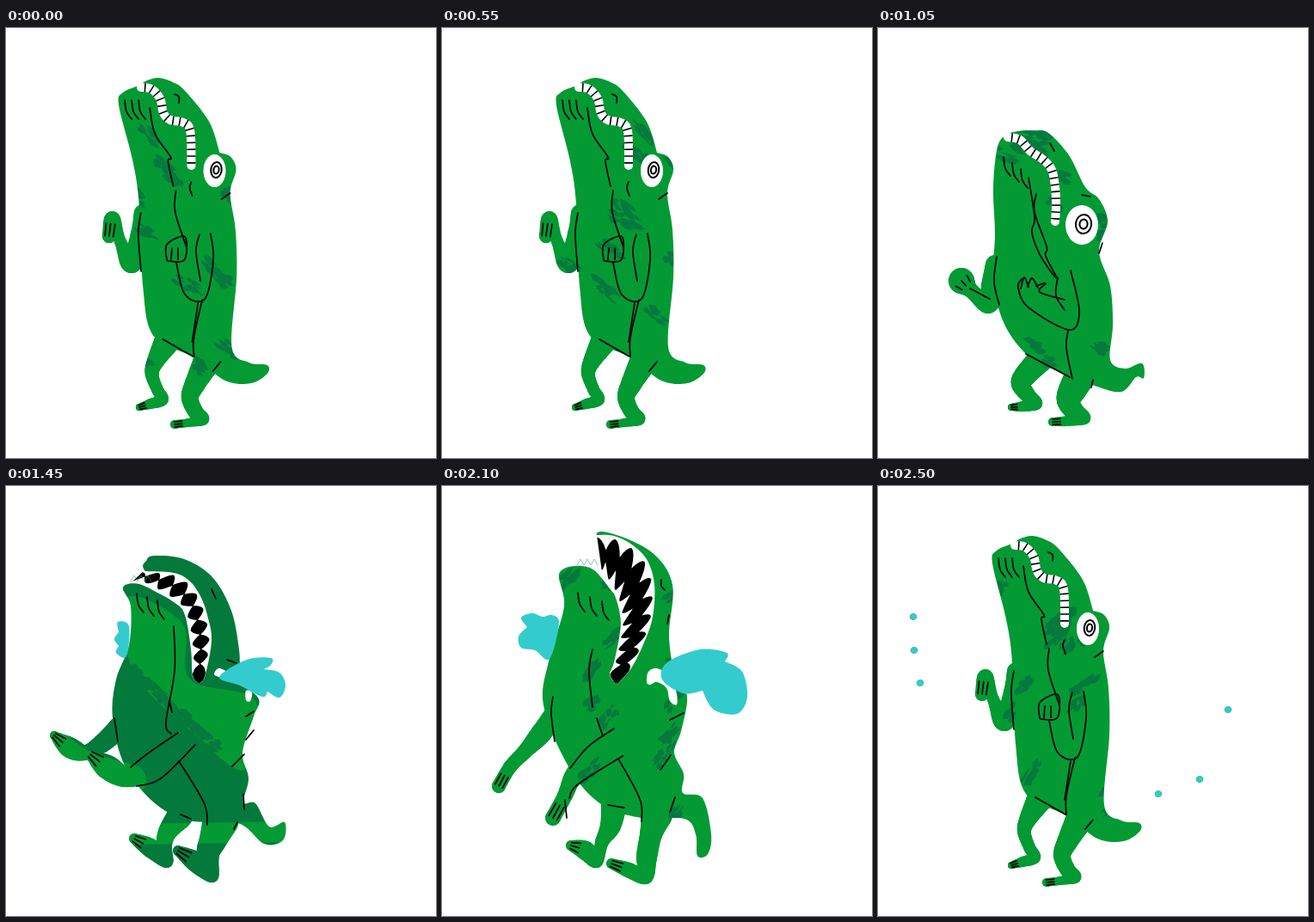
Recreate the animation shown at these times as an HTML page with a canvas. Size 500 by 500 pixels, loop 2550 ms.

```html
<!DOCTYPE html>
<html lang="en">
<head>
<meta charset="utf-8">
<title>Crying crocodile</title>
<style>
html, body { margin: 0; width: 100%; height: 100%; overflow: hidden; background: #fff; }
canvas { display: block; width: 500px; height: 500px; }
</style>
</head>
<body>
<canvas id="stage" width="500" height="500"></canvas>
<script>
const ctx = document.getElementById('stage').getContext('2d');
const GREEN = '#039a34', DARK = '#04793c', CYAN = '#34cbce', WHITE = '#fff', BLACK = '#000';
const STEP = 50, LOOP = 2550, BURST = 300, FIRST_BURST = 1500;

// Key points of smooth curves; a doubled point is a corner.
// Limbs run from the root to the tip as x,y,radius.
const poses = {
  stand: {
    body: '156,67 166,61 180,58 196,63 210,73 238,109 250,145 250,145 263,150 269,165 262,192 268,235 269,290 263,371 283,389 304,392 304,402 285,413 255,410 219,383 172,358 160,300 156,205 149,155 133,90 138,75',
    limbs: [
      '160,215,10 157,240,11 147,273,12 134,248,7 125,222,9 121,242,8',
      '234,388,16 220,414,12 214,430,10 221,447,9 229,455,7 212,459,5 196,461,5',
      '188,364,15 174,388,10 170,402,8 176,420,7 182,432,7 168,437,6 155,441,4'
    ],
    lines: [
      '158,215 155,240 158,283', '169,93 175,123 193,150 190,155 196,184', '199,189 198,214 211,255',
      '217,179 215,186 218,195', '198,77 203,80 203,87',
      '188,270 188,252 206,242 211,249 208,270 189,271', '194,256 193,269', '201,256 201,269',
      '199,273 209,310 232,315 242,270 239,239', '226,240 222,260 227,294',
      '229,316 219,360 219,382', '224,320 217,365', '183,362 218,382', '252,199 262,192', '241,399 250,388'
    ],
    folds: [140, 84, 8, 0],
    band: '159,69 171,71 181,82 185,99 193,107 208,110 216,120 217,160',
    eye: [244, 166, 13, 19]
  },
  crouch: {
    body: '150,124 163,120 180,119 198,122 222,148 241,185 257,199 267,225 257,260 270,300 273,345 270,386 287,396 307,390 309,407 300,406 283,423 252,416 204,397 171,378 145,340 134,290 136,240 134,185 139,138',
    limbs: [
      '136,275,11 133,300,13 128,321,11 108,305,9 97,294,15',
      '236,403,18 226,421,16 221,433,13 228,445,11 240,454,7 220,457,6 203,458,5',
      '190,384,15 172,403,13 166,414,11 175,428,9 184,437,7 168,440,6 155,441,4'
    ],
    lines: [
      '200,134 205,143', '175,174 182,220 179,238 189,265 206,290', '184,193 182,214 196,254 195,265 209,292',
      '237,194 247,196', '261,250 257,262', '224,282 234,330 222,351 175,325 163,302 167,292',
      '166,303 170,290 175,301', '174,301 179,291 186,302', '184,300 195,297 188,307 217,316', '209,290 207,311 217,328',
      '221,352 219,372 226,408', '172,379 223,406', '250,409 248,418', '138,266 135,295 141,322', '107,303 130,315'
    ],
    folds: [146, 150, 10, 7],
    band: '151,127 165,130 177,143 192,153 202,165 206,185 207,205 206,225',
    eye: [237, 229, 19, 23]
  },
  sob: {
    body: '161,98 163,87 172,81 207,85 240,106 262,145 271,190 274,226 294,248 288,268 275,310 282,340 276,368 290,369 306,396 324,391 322,412 300,416 270,392 213,389 172,368 138,325 124,270 128,225 143,185 145,140 136,118 155,114 190,130',
    limbs: [
      '132,281,13 112,299,11 92,310,9 74,304,12 56,290,5',
      '218,293,8 185,314,17 160,332,14 138,338,12 118,327,14 98,312,6',
      '250,388,21 241,411,16 235,428,13 240,454,7 222,438,12 200,424,6',
      '202,384,15 188,402,11 184,418,9 187,437,7 168,421,11 149,410,6'
    ],
    lines: [
      '239,120 244,131', '257,202 268,206', '195,163 196,215 186,275 192,288', '190,250 193,263', '126,270 130,297',
      '145,327 165,311 200,287', '152,349 180,340 220,301', '201,320 230,368 234,394', '203,382 215,387',
      '288,262 279,268', '288,284 279,295', '277,312 263,326', '276,358 277,376', '269,391 265,399'
    ],
    folds: [152, 125, 12, 4],
    upper: '160,99 195,101 213,110 226,128 234,150 239,180 231,222 224,229',
    lower: '146,112 158,113 195,135 208,150 215,190 217,221 224,229',
    gum: .1, tip: .48, snout: [145, 111],
    wings: [
      '248,222 280,202 308,200 308,208 300,213 300,213 318,217 325,232 318,246 304,239 304,239 298,245 272,232',
      '143,163 130,158 131,170 131,170 126,178 131,186 131,186 128,194 140,198'
    ],
    whites: ['242,219 247,212 256,216 250,222', '279,238 286,240 284,250 279,249']
  },
  wail: {
    body: '180,58 200,56 245,78 268,115 264,175 272,225 285,245 278,285 270,310 281,335 280,357 303,363 313,405 309,428 297,430 295,405 282,387 232,386 185,370 148,328 118,255 125,200 142,140 137,100 172,95 200,125 215,135 215,100',
    limbs: [
      '132,264,12 115,288,12 97,308,9 79,327,8 66,349,8',
      '205,298,16 176,316,17 153,338,11 143,360,9 129,386,9',
      '250,382,18 243,405,13 238,432,12 237,455,8 218,447,9 197,439,6',
      '200,370,15 196,395,12 186,414,8 180,437,7 167,424,11 150,418,6'
    ],
    lines: [
      '255,109 255,116 259,121', '175,190 171,215 175,257', '180,270 187,291', '129,245 127,265 131,297',
      '149,328 170,303 200,282', '148,363 158,347 210,314', '205,317 230,364 232,390', '193,371 212,374',
      '281,264 265,272', '266,313 254,330', '265,379 271,362', '264,150 262,160', '143,365 145,386'
    ],
    folds: [158, 124, 14, 5],
    upper: '180,57 200,58 222,69 239,87 247,115 245,152 235,182 220,212 205,229',
    lower: '186,100 200,125 207,150 207,170 200,205 195,219 201,229',
    gum: .06, tip: .36, snout: [157, 92],
    wings: [
      '256,225 262,205 300,190 331,194 329,204 329,204 349,216 355,245 345,264 325,264 312,256 303,238 303,238 280,241',
      '136,160 128,150 117,152 105,148 92,153 99,164 99,164 89,175 92,188 108,191 125,201'
    ],
    whites: ['238,228 240,216 250,212 262,220 272,238 273,254 265,250 261,235 250,228 242,231']
  }
};

// One letter per 100 ms: pose, height factor, lean
const order = 'ABABABABbcCCsdDEFDEFDEFDsB';
const beats = {
  A: ['stand', 1, .005], B: ['stand', 1], b: ['stand', .9], c: ['crouch', .97], C: ['crouch', 1],
  s: ['crouch', 1.1], d: ['sob', .98], D: ['sob', 1], E: ['wail', 1], F: ['wail', .97]
};

const mix = (a, b, k) => a.map((v, i) => v + (b[i] - v) * k);

// Samples a Catmull-Rom spline through points of any dimension
function spline(s, closed = false) {
  const p = s.split(' ').map(q => q.split(',').map(Number)), n = p.length, out = [];
  const at = i => closed ? p[(i + n) % n] : p[Math.max(0, Math.min(n - 1, i))];
  for (let i = 0; i < (closed ? n : n - 1); i++) {
    const [a, b, c, d] = [at(i - 1), at(i), at(i + 1), at(i + 2)];
    for (let t = 0; t < 1; t += .1) {
      out.push(b.map((v, j) => v + t / 2 * (c[j] - a[j] + t * (2 * a[j] - 5 * v + 4 * c[j] - d[j]
        + t * (3 * (v - c[j]) + d[j] - a[j])))));
    }
  }
  if (!closed) out.push(p[n - 1]);
  return out;
}

// Point at share u of a polyline's length, with its direction
function along(p, u) {
  const len = p.slice(1).map((q, i) => Math.hypot(q[0] - p[i][0], q[1] - p[i][1]));
  let d = u * len.reduce((a, b) => a + b), i = 0;
  while (i < len.length - 1 && d > len[i]) d -= len[i++];
  const [a, b] = [p[i], p[i + 1]];
  return [...mix(a, b, len[i] ? d / len[i] : 0), Math.atan2(b[1] - a[1], b[0] - a[0])];
}

function random(seed) {
  let s = seed * 7919 + 17;
  return () => {
    s = s + 0x6D2B79F5 | 0;
    let t = Math.imul(s ^ s >>> 15, 1 | s);
    t = t + Math.imul(t ^ t >>> 7, 61 | t) ^ t;
    return ((t ^ t >>> 14) >>> 0) / 4294967296;
  };
}

function trace(p) {
  ctx.beginPath();
  p.forEach(([x, y]) => ctx.lineTo(x, y));
}

function fill(p, color) {
  trace(p);
  ctx.fillStyle = color;
  ctx.fill();
}

function stroke(p, width = 1.7, color = BLACK) {
  trace(p);
  ctx.lineWidth = width;
  ctx.strokeStyle = color;
  ctx.stroke();
}

function oval(x, y, rx, ry, tilt = 0) {
  ctx.beginPath();
  ctx.ellipse(x, y, rx, ry, tilt, 0, 7);
}

function limb(s) {
  ctx.fillStyle = GREEN;
  for (const [x, y, r] of spline(s)) {
    oval(x, y, r, r);
    ctx.fill();
  }
}

// Three creases fanning back from the tip of a limb
function claws(s) {
  const p = spline(s), end = p[p.length - 1], root = p[p.length - 8];
  const a = Math.atan2(end[1] - root[1], end[0] - root[0]);
  for (const side of [-.6, 0, .6]) {
    stroke([end, root].map(([x, y, r]) => [x - Math.sin(a) * r * side, y + Math.cos(a) * r * side]));
  }
}

function folds([x, y, dx, dy]) {
  for (let i = 0; i < 3; i++, x += dx, y += dy) {
    stroke(spline(`${x},${y} ${x + 2},${y + 13} ${x + 8},${y + 22}`));
  }
}

// A dry brush mark: ragged slivers lying along one direction
function brush(rnd, x, y, angle, length) {
  const c = Math.cos(angle), s = Math.sin(angle);
  for (let i = 0; i < 14; i++) {
    const u = (rnd() - .5) * length, v = (rnd() - .5) * 12;
    const l = 3 + rnd() * length * .22, h = 1 + rnd() * 3;
    const shape = [[-l, 0], [-l * .3, -h], [l, -h * .6], [l * .6, h * .5], [-l * .2, h]];
    fill(shape.map(([a, b]) => [x + (u + a) * c - (v + b) * s, y + (u + a) * s + (v + b) * c]), DARK);
  }
}

function texture(frame, soaked) {
  const rnd = random(frame + 1);
  ctx.globalCompositeOperation = 'source-atop';
  if (soaked) {
    ctx.fillStyle = DARK;
    ctx.fillRect(0, 0, 500, 500);
    fill(spline('140,130 205,160 214,225 290,250 278,330 215,285 148,215', true), GREEN);
    stroke(spline('50,296 90,325 145,342'), 36, GREEN);
    stroke(spline('145,405 330,402'), 24, GREEN);
    for (let i = 0; i < 8; i++) brush(rnd, 145 + i * 13, 212 + i * 12, .7, 32);
  } else {
    const lean = frame < 20 ? .7 : frame < 28 ? .35 : -.8;
    for (let i = 0; i < 13; i++) {
      brush(rnd, 140 + rnd() * 135, 100 + rnd() * 310, lean + (rnd() - .5) * .4, 14 + rnd() * 26);
    }
  }
  ctx.globalCompositeOperation = 'source-over';
}

function closedTeeth(s) {
  const p = spline(s), ticks = 16;
  stroke(p, 10, WHITE);
  for (let i = 0; i < ticks; i++) {
    const [x, y, a] = along(p, (i + .6) / ticks), dx = Math.sin(a) * 4.5, dy = Math.cos(a) * 4.5;
    stroke([[x - dx, y + dy], [x + dx, y - dy]], 1.6);
  }
}

// Pointed teeth: the dark gap narrows sharply once per tooth
function openMouth({ upper, lower, gum, tip, snout: [x, y] }) {
  const up = spline(upper), low = spline(lower), teeth = 10, n = teeth * 8;
  fill([...up, ...low.slice().reverse()], WHITE);
  const edge = (a, b) => Array.from({ length: n + 1 }, (_, i) => {
    const u = i / n, bite = 1 - Math.abs(2 * (u * teeth % 1) - 1);
    const depth = u > .9 ? .02 : gum + (tip - gum) * bite ** 1.7;
    return mix(along(a, u), along(b, u), depth);
  });
  fill([...edge(up, low), ...edge(low, up).reverse()], BLACK);
  const fringe = Array.from({ length: 7 }, (_, i) => [x + i * 4, y - (i % 2) * 7]);
  stroke(fringe, .6, '#35ad78');
}

function openEye([x, y, rx, ry]) {
  oval(x, y, rx, ry);
  ctx.fillStyle = WHITE;
  ctx.fill();
  ctx.strokeStyle = BLACK;
  ctx.lineWidth = 2;
  for (const k of [.48, .24]) {
    oval(x + 2, y - 1, rx * k, ry * k, .12);
    ctx.stroke();
  }
}

function crocodile(key, frame) {
  const [name, tall, lean = 0] = beats[key], pose = poses[name], floor = 466;
  ctx.save();
  ctx.transform(1, 0, lean, tall, -lean * floor, floor * (1 - tall));
  fill(spline(pose.body, true), GREEN);
  pose.limbs.forEach(limb);
  texture(frame, frame === 28 || frame === 29);
  if (pose.band) {
    closedTeeth(pose.band);
    openEye(pose.eye);
  } else {
    openMouth(pose);
    pose.whites.forEach(s => fill(spline(s, true), WHITE));
    if (key !== 'd') pose.wings.forEach(s => fill(spline(s, true), CYAN));
  }
  pose.lines.forEach(s => stroke(spline(s)));
  pose.limbs.forEach(claws);
  folds(pose.folds);
  ctx.restore();
}

// Drops speed up away from the eyes, growing longer as they fly
function tears(time) {
  const age = (time - FIRST_BURST) % BURST;
  if (time < FIRST_BURST || age < 50) return;
  const k = (age * age - 1e4) / 52500, grow = Math.max(0, k);
  const sides = [
    { from: '41,152 42,191 49,229', dx: -35, dy: -16, stretch: -.4 },
    { from: '407,260 374,341 326,358', dx: 76, dy: 61, stretch: 4 }
  ];
  for (const { from, dx, dy, stretch } of sides) {
    for (const p of from.split(' ')) {
      const [x, y] = p.split(',').map(Number);
      oval(x + dx * k, y + dy * k, 3.8, 3.5 + stretch * grow, -.2);
      ctx.fillStyle = CYAN;
      ctx.fill();
      ctx.lineWidth = .8;
      ctx.strokeStyle = '#22b08f';
      ctx.stroke();
    }
  }
}

function draw(now) {
  const frame = Math.floor(now % LOOP / STEP);
  ctx.clearRect(0, 0, 500, 500);
  crocodile(order[frame >> 1], frame);
  tears(frame * STEP);
  requestAnimationFrame(draw);
}

ctx.lineCap = ctx.lineJoin = 'round';
draw(0);
</script>
</body>
</html>
```
